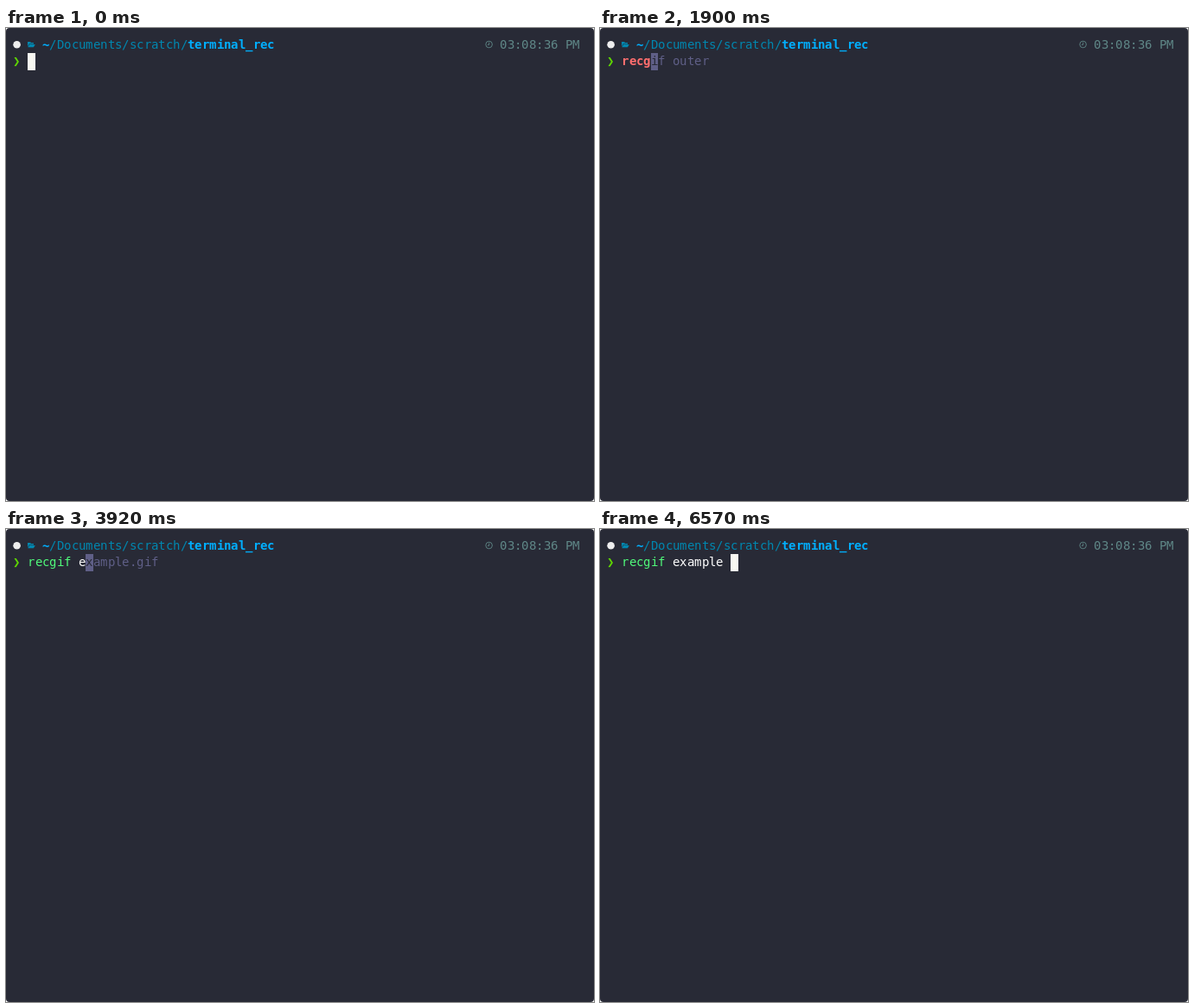
An HTML page with a canvas for the animation above (8000 ms loop, 680x548 px).

```html
<!DOCTYPE html>
<html lang="en">
<head>
<meta charset="utf-8">
<title>Terminal</title>
<style>
  html, body { margin: 0; width: 100%; height: 100%; overflow: hidden; background: #fff; }
  canvas { display: block; }
</style>
</head>
<body>
<canvas id="stage" width="680" height="548"></canvas>
<script>
const ctx = document.getElementById('stage').getContext('2d');
const LOOP = 8000;
const CELL = 8.4, ROW = 19.6, SIZE = 14;
const FONT = `${SIZE}px "DejaVu Sans Mono", monospace`;
const C = {
  bg: '#282a36', fg: '#f8f8f2', white: '#ffffff', hint: '#5f5f87',
  bad: '#ff6e6e', good: '#50fa7b', prompt: '#5fd700',
  path: '#0087af', dir: '#00afff', clock: '#5f8787'
};

// [start time, typed text, suggested full line]
const OLD = 'recgif outer', NEW = 'recgif example.gif';
const STEPS = [
  [0, '', ''],
  [660, 'r', OLD],
  [750, 're', OLD],
  [900, 'rec', OLD],
  [1000, 'rece', ''],
  [1550, 'rec', OLD],
  [1900, 'recg', OLD],
  [2030, 'recgi', OLD],
  [2140, 'recgif', OLD],
  [2860, 'recgif ', OLD],
  [3920, 'recgif e', NEW],
  [4070, 'recgif ex', NEW],
  [4280, 'recgif exa', NEW],
  [4370, 'recgif exam', NEW],
  [4590, 'recgif examp', NEW],
  [4650, 'recgif exampl', NEW],
  [5090, 'recgif example', NEW],
  [6570, 'recgif example ', '']
];
const COMMANDS = ['r', 'recgif'];

const colX = col => Math.round(col * CELL);
const rowY = row => Math.round((row + 0.5) * ROW);

// One glyph per terminal cell
function put(text, col, row, color, bold) {
  ctx.font = (bold ? 'bold ' : '') + FONT;
  ctx.fillStyle = color;
  const y = Math.round((row + 0.5) * ROW + SIZE);
  [...text].forEach((ch, i) => ctx.fillText(ch, colX(col + i), y));
}

function poly(color, points) {
  ctx.fillStyle = color;
  ctx.beginPath();
  points.forEach(([x, y]) => ctx.lineTo(x, y));
  ctx.fill();
}

function drawIcons() {
  ctx.fillStyle = '#eeeeee';
  ctx.beginPath();
  ctx.arc(12.6, 19.2, 4.3, 0, 7);
  ctx.fill();

  poly(C.path, [[25, 16], [28, 16], [29, 17], [32, 17], [32, 18.4], [26.8, 18.4], [25, 21.2]]);
  poly(C.path, [[27.1, 19], [33.8, 19], [31.9, 22.3], [25.2, 22.3]]);

  ctx.strokeStyle = C.clock;
  ctx.lineWidth = 0.9;
  ctx.beginPath();
  ctx.arc(558.6, 19, 3.8, 0, 7);
  ctx.moveTo(558.7, 16.6);
  ctx.lineTo(558.7, 19.4);
  ctx.lineTo(556.9, 19.4);
  ctx.stroke();
}

function drawHeader() {
  drawIcons();
  put('~', 5, 0, C.dir, true);
  put('/Documents/scratch/', 6, 0, C.path);
  put('terminal_rec', 25, 0, C.dir, true);
  put('03:08:36 PM', 68, 0, C.clock);
}

function drawInput(typed, full) {
  const start = 3, end = start + typed.length;
  const command = typed.split(' ')[0];
  const known = COMMANDS.includes(command);
  const rest = full.slice(typed.length);

  put('❯', 1, 1, C.prompt);
  put(command, start, 1, known ? C.good : C.bad, !known);
  put(typed.slice(command.length), start + command.length, 1, C.white);
  put(rest, end, 1, C.hint);

  ctx.fillStyle = rest ? C.hint : C.fg;
  ctx.fillRect(colX(end), rowY(1), colX(end + 1) - colX(end), rowY(2) - rowY(1));
  if (rest) put(rest[0], end, 1, C.bg);
}

function draw(t) {
  ctx.clearRect(0, 0, 680, 548);
  ctx.fillStyle = C.bg;
  ctx.beginPath();
  ctx.roundRect(0, 0, 680, 548, 4);
  ctx.fill();
  drawHeader();
  const [, typed, full] = STEPS.findLast(step => step[0] <= t);
  drawInput(typed, full);
}

let begin;
function tick(now) {
  begin ??= now;
  draw(Math.max(0, now - begin) % LOOP);
  requestAnimationFrame(tick);
}
draw(0);
requestAnimationFrame(tick);
</script>
</body>
</html>
```
